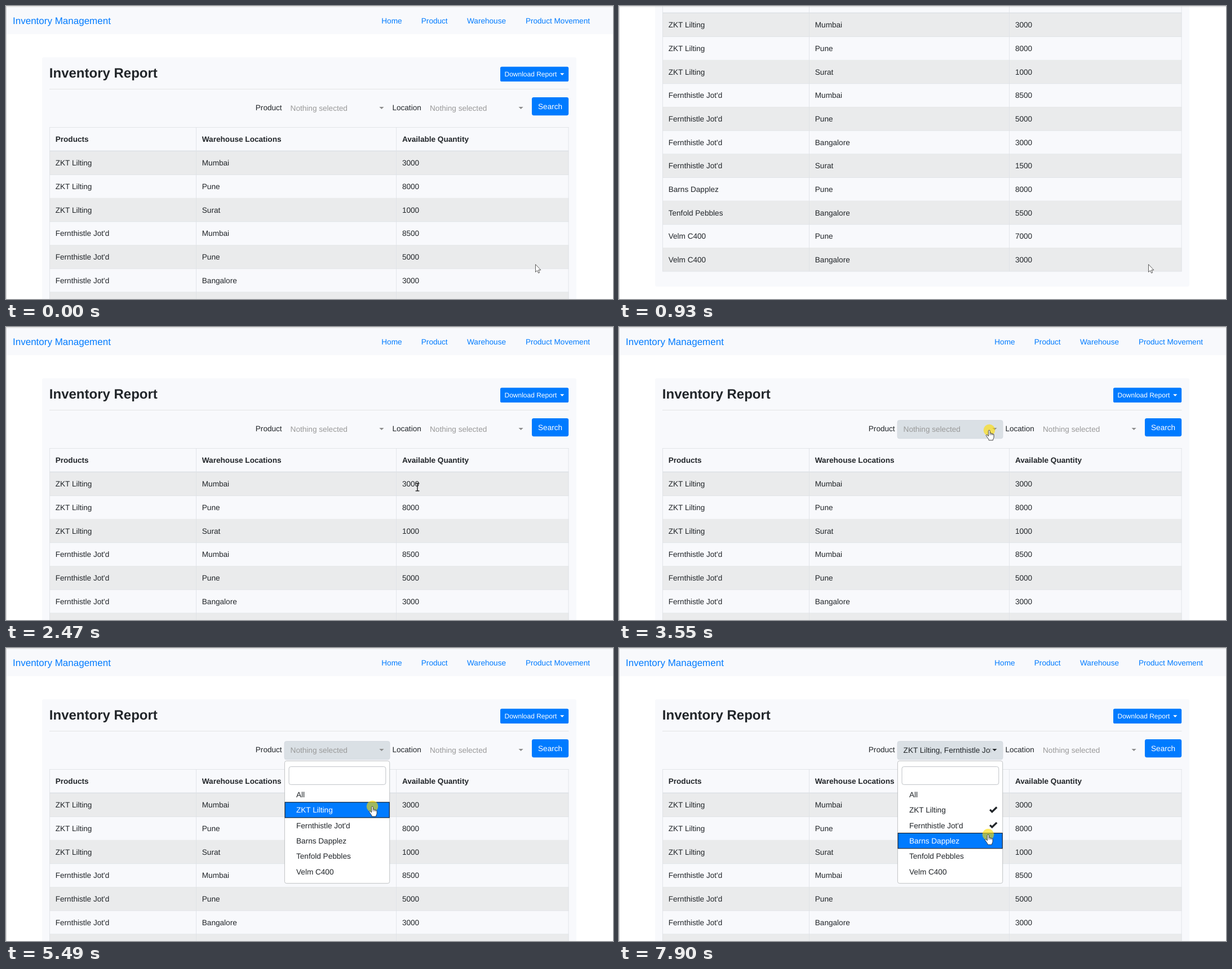
Write an HTML page that moves like this. It is 1077 by 520 pixels and loops after 8 s.

```html
<!DOCTYPE html>
<html lang="en">
<head>
<meta charset="utf-8">
<title>Inventory Report</title>
<style>
html, body { margin: 0; width: 100%; height: 100%; overflow: hidden; background: #fff; }
svg { display: block; width: 100%; height: 100%; }
text {
  font-family: "Liberation Sans", Arial, sans-serif; font-size: 13.6px;
  fill: #212529; white-space: pre; text-rendering: geometricPrecision;
}
.b { font-weight: 700; }
.link { fill: #007bff; }
.white { fill: #fff; }
.hint { fill: #999; }
</style>
</head>
<body>
<svg id="stage" viewBox="0 0 1077 520" xmlns="http://www.w3.org/2000/svg"></svg>
<script>
const LOOP = 8000, TICK = 77.3;
const ROW = 41.65, HEAD = 257.85;
const ITEM = 27.35, ITEM_TOP = 246.4;
const items = ["All", "ZKT Lilting", "Fernthistle Jot'd", "Barns Dapplez", "Tenfold Pebbles", "Velm C400"];
const stock = [
  [1, "Mumbai", 3000], [1, "Pune", 8000], [1, "Surat", 1000],
  [2, "Mumbai", 8500], [2, "Pune", 5000], [2, "Bangalore", 3000], [2, "Surat", 1500],
  [3, "Pune", 8000], [4, "Bangalore", 5500], [5, "Pune", 7000], [5, "Bangalore", 3000]
];
const cols = [87.7, 347.8, 702.9];

// page offset from each time on
const scrolls = [[0, 0], [70, 30], [146, 105], [222, 175], [299, 215], [609, 247],
  [922, 245], [999, 195], [1076, 105], [1152, 30], [1229, 0]];

// pointer: start, end, target
const home = [939, 458];
const moves = [
  [2080, 2470, 730, 284], [2770, 3150, 657, 183], [4100, 4650, 645, 276],
  [4720, 4950, 650, 281], [5800, 6030, 656, 309], [7350, 7500, 655, 331]
];

// clicks: shown, pressed, released, gone, chosen item (0 = the button)
const clicks = [
  [3310, 3385, 3600, 3775, 0], [5190, 5265, 5495, 5570, 1],
  [6340, 6415, 6620, 6715, 2], [7645, 7722, 8100, 8200, 3]
];

const text = (x, y, s, attrs = "") => `<text x="${x}" y="${y}" ${attrs}>${s}</text>`;
const rect = (x, y, w, h, fill, attrs = "") =>
  `<rect x="${x}" y="${y}" width="${w}" height="${h}" fill="${fill}" ${attrs}/>`;
const caret = (x, y, r, attrs) => `<path d="M${x - r} ${y}h${2 * r}l${-r} ${r}z" ${attrs}/>`;
const itemTop = i => ITEM_TOP + i * ITEM;

function table() {
  const bottom = HEAD + ROW * stock.length;
  let s = "";
  stock.forEach((r, i) => {
    const y = HEAD + ROW * i;
    if (i % 2 === 0) s += rect(77, y, 921.5, ROW, "#eaebec");
    s += rect(77, y + ROW - .4, 921.5, .85, "#dee2e6");
    [items[r[0]], r[1], r[2]].forEach((v, c) => s += text(cols[c], y + 25.6, v));
  });
  s += rect(77, 215, 921.5, .85, "#dee2e6") + rect(77, 256.5, 921.5, 1.7, "#dee2e6");
  for (const x of [77, 337, 692.2, 997.6]) s += rect(x, 215, .85, bottom - 215, "#dee2e6");
  ["Products", "Warehouse Locations", "Available Quantity"].forEach((v, c) =>
    s += text(cols[c], 240.8, v, 'class="b"'));
  return s;
}

function page() {
  return rect(0, 2, 1077, 48, "#f8f9fc")
    + text(12, 32.2, "Inventory Management", 'class="link" style="font-size:17px"')
    + [[666.3, "Home"], [736.8, "Product"], [818, "Warehouse"], [921.9, "Product Movement"]]
      .map(l => text(l[0], 30.9, l[1], 'class="link"')).join("")
    + rect(64, 91, 948, 652, "#f8f9fc", 'rx="3.4"')
    + text(76.8, 127, "Inventory Report", 'class="b" style="font-size:24px"')
    + rect(877, 107.8, 121.2, 26.3, "#007bff", 'rx="2.7"')
    + text(884.5, 125.4, "Download Report", 'class="white" style="font-size:12px"')
    + caret(986.8, 119.3, 3.6, 'fill="#fff"')
    + rect(77, 147.2, 921.5, .85, "#dfe0e2")
    + text(442.8, 184.8, "Product") + text(685.4, 184.8, "Location")
    + rect(494, 165.6, 187, 32.3, "#e2e6ea", 'id="btn" rx="3.4" stroke-width=".85"')
    + `<g clip-path="url(#value)">${text(504.6, 185.8, "", 'id="picked"')}</g>`
    + caret(666.4, 179, 4.1, 'id="arrow"')
    + text(752, 185.8, "Nothing selected", 'class="hint"')
    + caret(913.6, 179, 4.1, 'fill="#8e8e8e"')
    + rect(933, 161.9, 65.2, 32.3, "#007bff", 'rx="3.4"')
    + text(944, 182.6, "Search", 'class="white"')
    + table();
}

function menu() {
  return rect(494.4, 200.4, 186.3, 217.3, "#fff", 'rx="3.4" stroke="#b9bbbe" stroke-width=".9"')
    + rect(500.5, 209, 175, 35, "none", 'id="ring" rx="4.5" stroke="#bfdeff" stroke-width="2.8"')
    + rect(502, 210.6, 171.8, 31.8, "#fff", 'id="field" rx="3.4" stroke-width=".95"')
    + rect(512.4, 219, 1, 16, "#212529", 'id="bar"')
    + items.map((s, i) => {
      const y = itemTop(i);
      return rect(495, y, 185.2, ITEM, "none", `id="bg${i}"`)
        + text(515, y + 18.4, s, `id="item${i}"`)
        + `<path id="tick${i}" d="M658.2 ${y + 13.2}l3.7 3.7 8.4-8.1" fill="none" stroke="#212529" stroke-width="3.3"/>`;
    }).join("");
}

const pointers = {
  arrow: '<path d="M.5.6V14.2L3.6 11.4 5.7 16 7.7 15.1 5.8 10.6H9.9Z" fill="#fff" stroke="#333" stroke-width=".8"/>',
  beam: '<path d="M-3.4-6.7H-1Q0-6.7 0-5.7Q0-6.7 1-6.7H3.4M0-5.7V5.9M-3.4 6.9H-1Q0 6.9 0 5.9Q0 6.9 1 6.9H3.4" fill="none" stroke="#111" stroke-width="1.3"/>',
  hand: '<path d="M-1.6 1.6C-1.6-.3 1.2-.3 1.2 1.6V6C1.4 4.7 3.7 4.8 3.8 6.2V6.7C4 5.5 6 5.7 6.1 7V7.5C6.4 6.5 8.1 6.8 8.1 8.2V12.2C8.1 14.4 6.7 15 6.5 18H-.8C-.9 15.6-2.5 14.6-3.5 12.8L-5.6 9.8C-6.1 8.4-4.2 7.6-3.2 8.9L-1.6 10.8Z" fill="#fff" stroke="#222" stroke-width=".85" stroke-linejoin="round"/><path d="M1.2 6V9M3.8 6.7V9M6.1 7.5V9.2" stroke="#222" stroke-width=".75"/>'
};

const stage = document.getElementById("stage");
stage.innerHTML = '<defs><clipPath id="value"><rect x="500" y="166" width="159.5" height="32"/></clipPath></defs>'
  + `<g id="page">${page()}</g><g id="menu">${menu()}</g>`
  + rect(0, .5, 1077, 1, "#ccc") + rect(0, 1, 1, 519, "#cdcdd0")
  + '<circle id="spot" r="10.3" fill="#ffdd00"/><g id="pointer">'
  + Object.entries(pointers).map(([k, v]) => `<g id="${k}Cur">${v}</g>`).join("") + "</g>";

const el = {};
stage.querySelectorAll("[id]").forEach(n => el[n.id] = n);
const set = (id, k, v) => el[id].setAttribute(k, v);
const show = (id, on) => set(id, "visibility", on ? "visible" : "hidden");

function pointerAt(t) {
  const q = Math.floor((t + 10) / TICK) * TICK;
  let [x, y] = home;
  for (const [a, b, tx, ty] of moves) {
    const p = Math.min(1, Math.max(0, (q - a + 62) / (b - a + 47)));
    const e = p * p * (3 - 2 * p);
    x += (tx - x) * e;
    y += (ty - y) * e;
  }
  return [x, y];
}

function draw(t) {
  const offset = scrolls.filter(s => s[0] <= t).pop()[1];
  const [x, y] = pointerAt(t);
  const within = (l, r, top, bottom) => x >= l && x <= r && y >= top && y <= bottom;
  const click = clicks.find(c => t >= c[0] && t < c[3]);
  const pressed = click && t >= click[1] && t < click[2] ? click[4] : -1;
  const done = clicks.filter(c => t >= c[2]);
  const open = done.length > 0;
  const chosen = done.map(c => c[4]).filter(Boolean);
  const focus = open && pressed < 0;
  const onButton = within(494, 681, 166, 198);
  const hover = open && x > 495 && x < 680 ? Math.floor((y - ITEM_TOP) / ITEM) : -1;

  set("page", "transform", `translate(0 ${-offset})`);

  const down = open || pressed === 0;
  show("btn", onButton || down);
  set("btn", "fill", down ? "#dae0e5" : "#e2e6ea");
  set("btn", "stroke", down ? "#d3d9df" : "#dae0e5");
  el.picked.textContent = chosen.map(i => items[i]).join(", ") || "Nothing selected";
  set("picked", "class", chosen.length ? "" : "hint");
  set("arrow", "fill", chosen.length ? "#212529" : "#8e8e8e");

  set("menu", "display", open ? "inline" : "none");
  if (open) {
    const since = t - done[done.length - 1][2];
    set("ring", "display", focus ? "inline" : "none");
    set("field", "stroke", focus ? "#80bdff" : "#bcc0c4");
    set("bar", "display", focus && Math.floor(since / 500) % 2 === 0 ? "inline" : "none");
    items.forEach((_, i) => {
      const active = i === pressed;
      set("bg" + i, "fill", active ? "#007bff" : i === hover ? "#f8f9fa" : "none");
      set("bg" + i, "stroke", active ? "#101010" : "none");
      set("item" + i, "class", active ? "white" : "");
      set("tick" + i, "display", chosen.includes(i) ? "inline" : "none");
    });
  }

  show("spot", !!click);
  if (click) {
    const edge = t < click[1] || t >= click[2] + 75;
    set("spot", "transform", `translate(${x} ${y})`);
    set("spot", "opacity", edge ? .35 : .62);
  }

  const overText = within(703, 734, 274, 290) || (open && within(502, 674, 210, 243));
  const kind = overText ? "beam" : onButton || (hover >= 0 && hover < items.length) ? "hand" : "arrow";
  for (const k in pointers) show(k + "Cur", k === kind);
  set("pointer", "transform", `translate(${x} ${y})`);
}

const begin = performance.now();
function frame() {
  draw((performance.now() - begin) % LOOP);
  requestAnimationFrame(frame);
}
draw(0);
requestAnimationFrame(frame);
</script>
</body>
</html>
```
